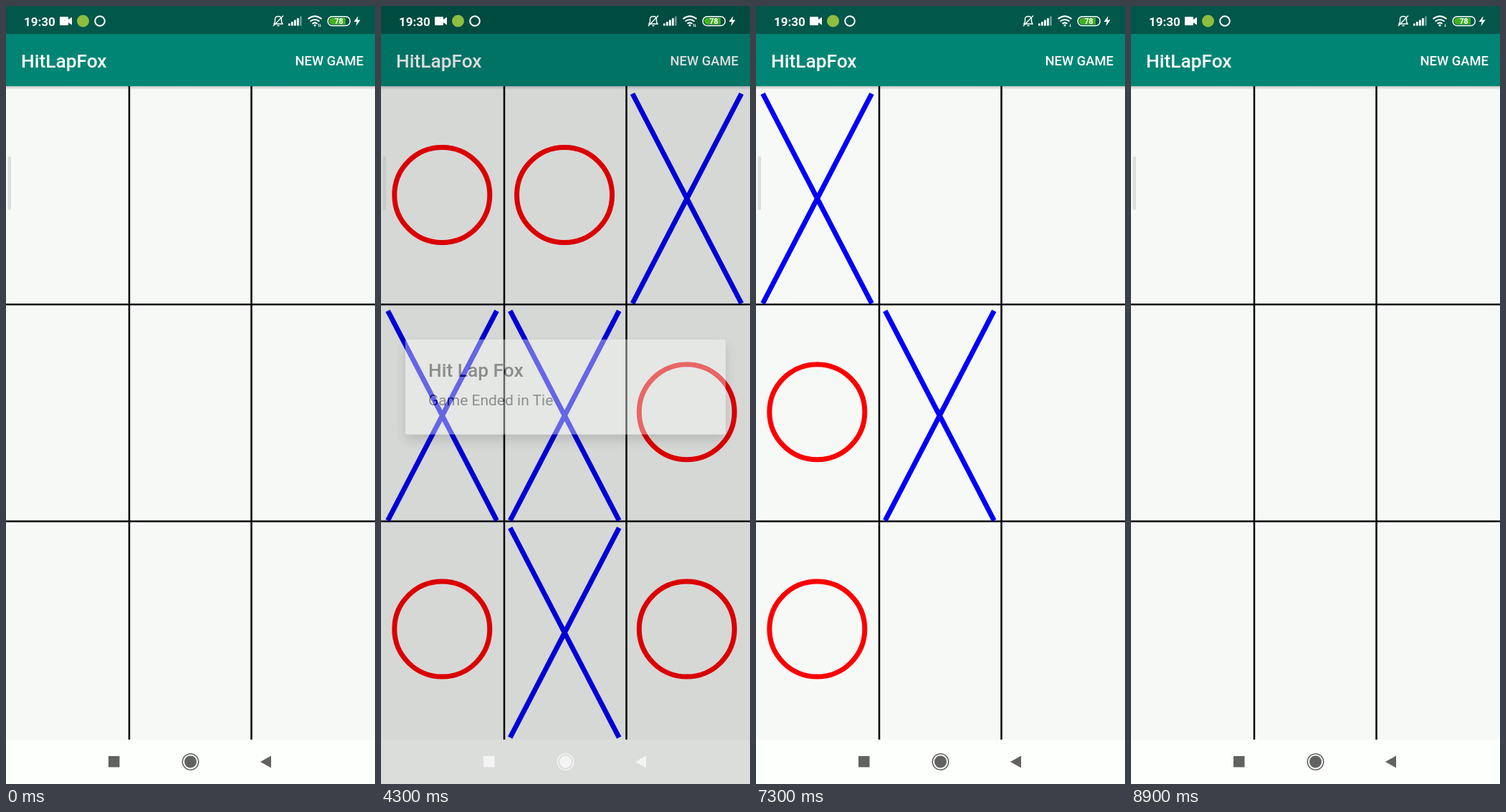
These frames come from a looping animation (515x1087 px, 9000 ms). An HTML page:

```html
<!DOCTYPE html>
<html lang="en">
<head>
<meta charset="utf-8">
<title>HitLapFox</title>
<style>
  html, body { margin: 0; width: 100%; height: 100%; overflow: hidden; background: #f7f9f7; }
  svg { display: block; width: 100%; height: 100%; font-family: Roboto, sans-serif; }
  .medium { font-weight: 500; }
  .title { font-size: 26.3px; }
  .marks { fill: none; stroke-width: 7; }
  .x { stroke: #0000f6; }
  .o { stroke: #fb0000; }
</style>
</head>
<body>
<svg viewBox="0 0 515 1087" preserveAspectRatio="none">
  <defs>
    <linearGradient id="barShadow" x2="0" y2="1">
      <stop stop-opacity=".2"/>
      <stop offset="1" stop-opacity="0"/>
    </linearGradient>
    <filter id="cardShadow" x="-10%" y="-30%" width="120%" height="170%">
      <feDropShadow dx="0" dy="8" stdDeviation="8" flood-color="#000" flood-opacity=".34"/>
    </filter>
  </defs>

  <rect width="515" height="1087" fill="#f7f9f7"/>
  <path d="M172 112V1025M342.5 112V1025M0 417H515M0 720H515" stroke="#000" stroke-width="2.5"/>
  <g id="board" class="marks"></g>
  <rect y="1025" width="515" height="62" fill="#fdfffc"/>
  <rect y="112" width="515" height="5" fill="url(#barShadow)"/>
  <rect y="39" width="515" height="73" fill="#008574"/>
  <rect width="515" height="39" fill="#00574a"/>
  <g class="medium" fill="#fff">
    <text class="title" x="21" y="86">HitLapFox</text>
    <text x="499" y="83" font-size="18.4" text-anchor="end">NEW GAME</text>
  </g>

  <rect id="dim" width="515" height="1087"/>

  <!-- system overlays stay above the dimming -->
  <rect x="2.5" y="210" width="4.5" height="75" rx="2" fill="#b7b7b7" opacity=".42"/>
  <g fill="#fff">
    <text x="25" y="27.5" font-size="17" font-weight="700">19:30</text>
    <path d="M76 15H86Q87 15 87 16V19L92 15.5V26.5L87 23V26Q87 27 86 27H76Q75 27 75 26V16Q75 15 76 15Z"/>
    <circle cx="107.5" cy="21" r="8.5" fill="#8fbd40"/>
    <circle cx="131" cy="21" r="6.8" fill="none" stroke="#fff" stroke-width="2"/>
    <path d="M374 25H386L384.500 22V18.500Q384.500 14.500 380 14.500T375.500 18.500V22ZM378.500 27.500H381.500M373 28L387 13.500"
          fill="none" stroke="#fff" stroke-width="1.4"/>
    <g id="signal"></g>
    <g fill="none" stroke="#fff" stroke-width="2">
      <path d="M421.500 18Q431 10.500 440.500 18M424.500 21.500Q431 16.500 437.500 21.500M427.500 24.700Q431 22 434.500 24.700"/>
    </g>
    <circle cx="431" cy="27" r="1.6"/>
    <path d="M438.500 25V29M437.300 27.700L438.500 29L439.700 27.700" fill="none" stroke="#fff" stroke-width=".8"/>
    <path id="upload" d="M436.500 29V25M435.500 26.300L436.500 25" fill="none" stroke="#fff" stroke-width=".8"/>
    <rect x="449.200" y="14.700" width="31" height="12.800" rx="6" fill="none" stroke="#fff" stroke-width="1.5"/>
    <path d="M455.500 16.500H474V25.700H455.500A4.600 4.600 0 0 1 455.500 16.500Z" fill="#43b021"/>
    <text x="464.500" y="25" font-size="10.500" font-weight="700" text-anchor="middle">78</text>
    <path d="M491.500 14L485.500 22H489.500L488.500 28L494.500 19.500H490.500Z"/>
  </g>
  <g id="nav">
    <rect x="143" y="1048" width="15.500" height="15.500"/>
    <circle cx="257.500" cy="1056" r="8.500"/>
    <path d="M355 1056L370 1047.500V1064.500Z"/>
    <circle id="homeRing" cx="257.500" cy="1056" r="11.200" fill="none" stroke-width="1.5"/>
  </g>

  <g id="card">
    <rect x="34" y="466" width="447" height="132.500" rx="2.500" fill="#fdfffd" filter="url(#cardShadow)"/>
    <text class="title medium" x="66" y="518" fill="#1b1e20">Hit Lap Fox</text>
    <text id="message" x="66" y="558" font-size="21" fill="#222426"></text>
  </g>
</svg>
<script>
const LOOP = 9000, STEP = 100;
const $ = id => document.getElementById(id);
const clamp = v => Math.min(1, Math.max(0, v));
const smooth = v => v * v * (3 - 2 * v);

// Moves are [time, mark, column, row]
const games = [
  { end: 4300, clear: 5200, text: 'Game Ended in Tie', moves: [
    [500, 'o', 2, 2], [500, 'x', 1, 1], [2100, 'o', 2, 1], [2100, 'x', 2, 0],
    [2800, 'o', 0, 2], [2800, 'x', 1, 2], [3400, 'o', 1, 0], [3400, 'x', 0, 1],
    [4300, 'o', 0, 0]] },
  { end: 7400, clear: 8500, text: 'Game ended 1 win.', moves: [
    [6000, 'o', 0, 2], [6000, 'x', 1, 1], [6400, 'o', 0, 1], [6400, 'x', 0, 0],
    [7400, 'o', 1, 2], [7400, 'x', 2, 2]] }
];

function svg(tag, attrs, parent) {
  const node = document.createElementNS('http://www.w3.org/2000/svg', tag);
  for (const key in attrs) node.setAttribute(key, attrs[key]);
  return parent.appendChild(node);
}

function addMark(kind, col, row) {
  const x = 170.75 * col, y = 303.3 * row;
  return kind === 'o'
    ? svg('circle', { class: 'o', cx: 85.3 + x, cy: 264 + y, r: 66.5 }, $('board'))
    : svg('path', { class: 'x', d: `M${9.5 + x} ${122.5 + y}l152 293m0 -293l-152 293` }, $('board'));
}

const marks = games.flatMap(({ clear, moves }) =>
  moves.map(([start, ...mark]) => ({ start, clear, node: addMark(...mark) })));

for (let i = 0; i < 5; i++) {
  const height = 3 + 2.5 * i;
  svg('rect', { x: 394 + 4 * i, y: 27.5 - height, width: 2.8, height, opacity: i < 4 ? 1 : .4 }, $('signal'));
}

function render(time) {
  for (const { start, clear, node } of marks)
    node.style.display = time >= start && time < clear ? '' : 'none';

  const game = games.find(g => time >= g.end && time < g.clear + 200);
  let dim = 0, card = 0;
  if (game) {
    const age = time - game.end;
    const leave = 1 - clamp((time - game.clear) / 200);
    dim = .61 * smooth(clamp((age + 90) / 300)) * leave;
    card = clamp((age + 80) / 200) * leave;
    $('message').textContent = game.text;
  }
  $('dim').setAttribute('opacity', dim);
  $('card').setAttribute('opacity', card);
  $('nav').setAttribute('fill', game ? '#fff' : '#000');
  $('nav').setAttribute('opacity', game ? .7 : .61);
  $('homeRing').setAttribute('stroke', game ? '#fff' : '#000');
  $('upload').style.display = time < 5200 ? '' : 'none';
}

const origin = performance.now();
function tick() {
  const time = (performance.now() - origin) % LOOP;
  render(Math.floor(time / STEP) * STEP);
  requestAnimationFrame(tick);
}
tick();
</script>
</body>
</html>
```
